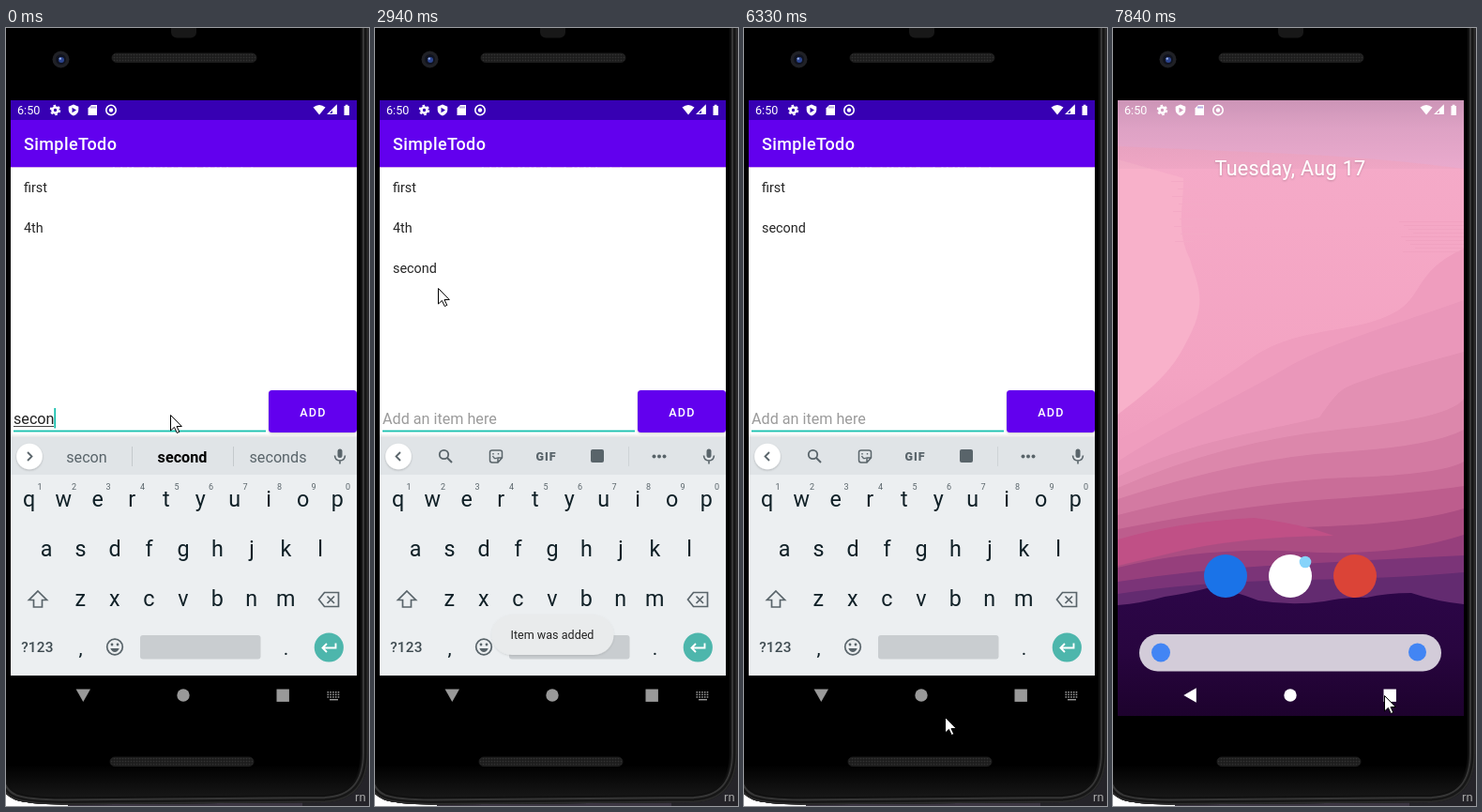
These frames come from a looping animation (387x829 px, 7.99 s). An HTML page:

```html
<!DOCTYPE html>
<html lang="en">
<head>
<meta charset="utf-8">
<title>Todo list demo</title>
<style>
html, body { margin: 0; width: 100%; height: 100%; overflow: hidden; background: #000; }
svg { display: block; width: 100%; height: 100%; font-family: Roboto, "Noto Sans", sans-serif; }
text { white-space: pre; }
</style>
</head>
<body>
<svg id="stage" viewBox="0 0 387 829"></svg>
<script>
const LOOP = 7990;
const TEAL = '#16c0ae', VIOLET = '#6200ee', INK = '#102027', ICON = '#59646a';
const BODY = 'M-8-10H386V772Q386 823 340 825L60 827.500Q22 827 9 822Q-5 816-8 800Z';

// Markup helpers
const text = (x, y, s, size, fill, more = '') =>
  `<text x="${x}" y="${y}" font-size="${size}" fill="${fill}" ${more}>${s}</text>`;
const mid = (x, y, s, size, fill, more = '') => text(x, y, s, size, fill, 'text-anchor="middle" ' + more);
const rect = (x, y, w, h, fill, more = '') =>
  `<rect x="${x}" y="${y}" width="${w}" height="${h}" fill="${fill}" ${more}/>`;
const circle = (x, y, r, fill, more = '') => `<circle cx="${x}" cy="${y}" r="${r}" fill="${fill}" ${more}/>`;
const path = (d, fill, more = '') => `<path d="${d}" fill="${fill}" ${more}/>`;
const line = (d, color, w = 1.6, more = '') => path(d, 'none', `stroke="${color}" stroke-width="${w}" ${more}`);
const group = (id, body, more = '') => `<g id="${id}" ${more}>${body}</g>`;
const gradient = (id, stops) => `<linearGradient id="${id}" x2="0" y2="1">` +
  stops.map(([o, c, a = 1]) => `<stop offset="${o}" stop-color="${c}" stop-opacity="${a}"/>`).join('') +
  '</linearGradient>';
const shadow = (id, blur, alpha) => `<filter id="${id}" x="-20%" y="-30%" width="140%" height="170%">
  <feDropShadow dx="0" dy="1" stdDeviation="${blur}" flood-opacity="${alpha}"/></filter>`;

const defs = `<defs>
  ${gradient('sky', [[0, '#f4acca'], [.2, '#f5a8c6'], [.45, '#f3a3c2'], [.65, '#ec98bb'], [.83, '#6b2f70']])}
  ${gradient('hill', [[0, '#2c0648'], [.5, '#28053f'], [1, '#1d022d']])}
  ${gradient('scrim', [[0, '#403050', .2], [.4, '#403050', .1], [1, '#403050', .03]])}
  ${gradient('lip', [[0, '#000', 0], [1, '#000', .1]])}
  ${gradient('chin', [[0, '#000'], [1, '#1c1c1c']])}
  <pattern id="mesh" width="3" height="3" patternUnits="userSpaceOnUse">
    <rect width="3" height="3" fill="#1d1d1d"/><circle cx="1.5" cy="1.5" r=".8" fill="#323232"/></pattern>
  ${shadow('soft', 1.3, .22)}${shadow('faint', 1.2, .12)}
  <clipPath id="screen"><rect x="5" y="77" width="369" height="656"/></clipPath>
  <clipPath id="case"><path d="${BODY}"/></clipPath>
</defs>`;

function phone() {
  const rim = [[16, '#101010'], [12, '#363636'], [8, '#161616'], [3, '#2c2c2c']];
  return rect(0, 0, 387, 829, '#252429') + rect(0, 800, 66, 29, '#fff') +
    rect(66, 825, 250, 4, '#3c3642') + text(372, 824, 'rn', 13, '#a5a5a5') +
    `<g clip-path="url(#case)">` + path(BODY, '#000') + rect(0, 785, 387, 42, 'url(#chin)') +
    rim.map(([w, c]) => line(BODY, c, w)).join('') + '</g>' +
    rect(0, 0, 376, 20, '#000') +
    rect(176, -8, 27, 18.5, '#181818', 'rx="6"') +
    rect(113, 27, 154, 9.5, 'url(#mesh)', 'rx="4.700" stroke="#222" stroke-width=".800"') +
    rect(111, 777, 153, 9.5, 'url(#mesh)', 'rx="4.700" stroke="#222" stroke-width=".800"') +
    circle(58.5, 33.5, 9, '#202126') + circle(58.5, 33.5, 5.5, '#10131f') +
    circle(59, 34, 3, '#2c458f') + circle(57.8, 32.6, 1.2, '#9db4ea');
}

function status() {
  const w = '#fff';
  return text(12, 92, '6:50', 12.6, w) +
    circle(52.5, 87.5, 3, 'none', `stroke="${w}" stroke-width="2.600"`) +
    circle(52.5, 87.5, 4.8, 'none', `stroke="${w}" stroke-width="1.900" stroke-dasharray="2.510"`) +
    path('M72 81.500L77.300 83.700V87.500Q77 91.500 72 93.600Q67 91.500 66.700 87.500V83.700ZM70.500 84.800V90.200L75 87.500Z', w, 'fill-rule="evenodd"') +
    path('M91 82H97V93H87.500V85.500Z', w) + line('M91 83.500V85.500M93 83.500V85.500M95 83.500V85.500', '#6a4cc0', .9) +
    circle(112, 87.5, 5.2, 'none', `stroke="${w}" stroke-width="1.600"`) + circle(112, 87.5, 2.2, w) +
    path('M327.500 84.500Q334 79.500 340.500 84.500L334 92.500Z', w) +
    line('M343.500 91.500H352.200V82.800Z', w, 1.2) + path('M348 87V91.500H352.500V82.500Z', w) +
    path('M360.500 83H361.800V81.700H364.500V83H366V93H360.500Z', w);
}

function wallpaper() {
  const down = 'V733H5Z';
  const bands = [
    ['M5 77H374V150Q280 138 190 134T5 126Z', '#efaed1'],
    ['M5 412C40 385 62 368 78 335C104 290 88 270 82 246C66 215 76 185 75 160L5 140Z', '#f8b1ca'],
    ['M5 440C60 410 100 385 150 350C195 320 250 325 290 308C335 290 315 262 374 235' + down, '#ef9dbe'],
    ['M5 462C70 420 120 400 180 365C230 335 290 320 374 290' + down, '#ea97ba'],
    ['M5 478C80 440 170 428 220 415C245 380 240 385 290 368L374 345' + down, '#e390b3'],
    ['M5 490Q120 440 240 428T374 395' + down, '#dc87ab'],
    ['M5 502Q140 458 240 452T374 428' + down, '#d37aa2'],
    ['M5 519Q150 482 250 479T374 462' + down, '#c96d98'],
    ['M5 534Q140 508 230 502T374 488' + down, '#bd5d8d'],
    ['M5 558Q80 535 200 532T374 512' + down, '#ab4d82'],
    ['M5 545Q70 526 150 522Q200 528 235 541Q130 542 60 560L5 573Z', '#c05086'],
    ['M5 575Q100 552 200 558T374 540' + down, '#963f7c'],
    ['M5 590Q90 577 180 572T374 562' + down, '#7b3478'],
    ['M5 603Q90 590 200 588T374 580' + down, '#632b70']
  ].map(([d, c]) => path(d, c)).join('');
  const streaks = Array.from({ length: 9 }, (_, i) =>
    rect(62 + i * 7 % 13, 163 + i * 8, 20 + i * 11 % 22, 1, '#f4aac6') +
    rect(305 + i * 5 % 18, 206 + i * 4, 69 - i * 5 % 18, 1, '#ee9fbe', 'opacity=".600"')).join('');
  return rect(5, 77, 369, 656, 'url(#sky)') + bands + streaks +
    path('M5 615Q30 613 55 606Q82 602 104 596Q130 600 155 610Q190 616 225 611Q250 606 270 607Q292 602 318 602Q345 611 374 614V733H5Z', 'url(#hill)');
}

function launcher() {
  return mid(189, 157, 'Tuesday, Aug 17', 21.5, '#fff', 'letter-spacing=".350" filter="url(#soft)"') +
    group('icons', rect(28, 646, 322, 39.5, '#d3ccd9', 'rx="19.700"') +
      circle(120, 584, 23, '#1a73e8') + circle(189, 584, 23, '#fff') + circle(205, 569, 6.3, '#86d3fa') +
      circle(258, 584, 23, '#db4437') + circle(51, 665.5, 10, '#4285f4') + circle(324.5, 665, 9.5, '#4285f4'));
}

function app() {
  const item = (id, y, s) => text(19, y, s, 14.4, '#262626', `id="${id}"`);
  return rect(5, 77, 369, 21, '#3700b3') + rect(5, 98, 369, 50.5, VIOLET) + rect(5, 148.5, 369, 560, '#fff') +
    text(19, 130, 'SimpleTodo', 18, '#fff', 'font-weight="500" letter-spacing=".400"') +
    item('row0', 175, 'first') + item('row1', 218, '4th') + item('row2', 261, 'second') +
    text(8, 422, '', 16.16, '#212121', 'id="entry"') +
    rect(8, 424, 43, 1, '#444', 'id="composing"') +
    rect(8, 428.6, 269, 1.8, TEAL) + rect(8, 405, 1.8, 21.5, TEAL, 'id="caret"') +
    rect(280, 386, 94, 45, VIOLET, 'id="button" rx="3.500" filter="url(#soft)"') +
    mid(327.5, 413.5, 'ADD', 12.57, '#fff', 'font-weight="500" letter-spacing="1.200"');
}

function keyRow(letters, x, y) {
  return [...letters].map((c, i) => mid(x + i * 36.5, y, c, 23.3, INK)).join('');
}

function keyboard() {
  const mic = rect(353.5, 448.5, 5, 9.5, ICON, 'rx="2.500"') +
    line('M350.500 455.500Q351 461 356 461T361.500 455.500M356 461V464.500', ICON);
  const guesses = group('guesses',
    mid(86, 462.5, 'secon', 16.16, ICON, 'id="left"') +
    mid(188, 462.5, 'second', 16.16, '#000', 'font-weight="700"') +
    mid(290, 462.5, 'seconds', 16.16, ICON, 'id="right"') +
    line('M134.500 446V467M242.500 446V467', '#c4c9cc', 1));
  const tools = group('tools',
    circle(73.5, 454.5, 4.7, 'none', `stroke="${ICON}" stroke-width="1.800"`) + line('M77 458L82 463', ICON, 2) +
    line('M125 450H133Q135.500 450 135.500 452V458L131 463H125Q122.500 463 122.500 460.500V452Q122.500 450 125 450ZM131 463V458H135.500', ICON, 1.5) +
    line('M125.500 456Q127.500 460 130 458M126 453V454.500M131.500 453V454.500', ICON, 1.4) +
    mid(182.5, 460.5, 'GIF', 12.5, ICON, 'font-weight="900" letter-spacing="1"') +
    rect(230, 449, 14, 14, ICON, 'rx="2"') + line('M270.500 446V467', '#cfd4d7', 1) +
    [297.5, 303, 308.5].map(x => circle(x, 456.5, 2, ICON)).join(''));
  const digits = [...'1234567890'].map((c, i) => mid(36 + i * 36.5, 492, c, 9, ICON)).join('');
  return rect(5, 432, 369, 4, 'url(#lip)') + rect(5, 436, 369, 254, '#eceff1') + rect(5, 436, 369, 40, '#e0e4e7') +
    circle(25, 456.5, 13.8, '#fff', 'filter="url(#soft)"') +
    line('M23 452L27.500 456.500L23 461', ICON, 1.8, 'id="chevron"') + guesses + tools + mic +
    keyRow('qwertyuiop', 24.7, 510) + digits + keyRow('asdfghjkl', 43, 562.5) + keyRow('zxcvbnm', 79.3, 615.5) +
    line('M34 600L43.500 609.500H38.500V617H29.500V609.500H24.500Z', ICON, 1.7) +
    line('M339.500 601.500H354.500V616.500H339.500L333.500 609ZM342.500 605.500L350 613M350 605.500L342.500 613', ICON, 1.7) +
    mid(33.5, 665, '?123', 15.3, '#3f4b51', 'font-weight="500" letter-spacing=".300"') +
    mid(79.5, 668, ',', 21, INK) + mid(298.5, 668, '.', 21, INK) +
    circle(116, 659.5, 8.3, 'none', `stroke="${ICON}" stroke-width="1.700"`) +
    circle(113, 657, 1.4, ICON) + circle(119, 657, 1.4, ICON) + path('M111.300 661H120.700Q119 665 116 665T111.300 661Z', ICON) +
    rect(143, 647, 128.5, 25.5, '#c9cdd0', 'rx="3"') + circle(344.3, 660, 15.6, '#4db6ac') +
    line('M351.500 655.500V660.500H338M342 656L337.500 660.500L342 665', '#fff', 1.9);
}

function navigation() {
  const dots = Array.from({ length: 15 }, (_, i) => rect(342.5 + i % 5 * 2.8, 707 + Math.floor(i / 5) * 2.6, 1.6, 1.5, '#999')).join('');
  return group('shapes', path('M-7.700-6.500H7.700L0 7Z', 'inherit', 'id="back"') +
    '<circle cx="189" cy="711" r="6.700"/><rect x="288.500" y="704.500" width="13.400" height="13.400"/>') +
    group('imeIcon', dots + rect(345, 715, 9, 1.4, '#999'));
}

const pointer = path('M0 0V16.500L3.900 12.900L6.800 19L9.300 17.900L6.500 12H11.800Z', '#fff', 'id="pointer" stroke="#000" stroke-width="1"');

document.getElementById('stage').innerHTML = defs + phone() +
  `<g clip-path="url(#screen)">` +
  group('home', wallpaper() + rect(5, 77, 369, 73, 'url(#scrim)', 'id="shade"') + group('launcher', launcher())) +
  group('appLayer', group('app', app()) + group('keys', keyboard()) +
    rect(5, 693, 369, 5, '#c9c9c9', 'id="foot"') + rect(5, 690, 369, 50, '#000', 'id="navBar"')) +
  status() + navigation() +
  group('toast', rect(0, 625, 10, 43, '#e9ebec', 'id="toastBox" rx="21.500" filter="url(#faint)"') +
    mid(189, 651, '', 12.57, '#222', 'id="toastText"')) + '</g>' + pointer;

const el = {};
document.querySelectorAll('svg [id]').forEach(n => el[n.id] = n);
const set = (id, attrs) => { for (const k in attrs) el[id].setAttribute(k, attrs[k]); };
const show = (id, on) => set(id, { visibility: on ? 'visible' : 'hidden' });
const say = (id, s) => { if (el[id].textContent !== s) el[id].textContent = s; };
const within = (t, a, b) => t >= a && t < b;

// Piecewise linear track of [time, value...]
function track(t, keys) {
  const i = keys.findIndex(k => k[0] > t);
  if (i < 0) return keys[keys.length - 1].slice(1);
  if (!i) return keys[0].slice(1);
  const a = keys[i - 1], b = keys[i], f = (t - a[0]) / (b[0] - a[0]);
  return a.slice(1).map((v, k) => v + (b[k + 1] - v) * f);
}

const bursts = [[810, 1850, 9], [1970, 2510, 5], [2940, 3850, 8], [4000, 4920, 8], [5050, 6020, 7], [6180, 7140, 8], [7280, 7840, 5]];
function tick(t) {
  let q = 0;
  for (const [a, b, n] of bursts) {
    if (t < a) break;
    const step = (b - a) / (n - 1);
    q = a + step * Math.min(n - 1, Math.floor((t - a) / step + 1e-6));
  }
  return q;
}

const route = [[830, 175, 412], [1100, 225, 424], [1450, 287, 419], [1850, 287, 419], [2240, 165, 345], [2510, 75, 288],
  [2940, 67, 277], [3350, 32, 215], [4130, 30, 215], [4530, 110, 310], [4920, 275, 475], [5050, 307, 530], [5370, 321, 650],
  [5700, 290, 745], [6020, 240, 759], [6590, 191, 711], [6870, 191, 711], [7000, 192, 712], [7280, 205, 714], [7700, 289, 711]];
const fade = [[1590, 0], [1720, .4], [1850, .9], [1970, 1], [3590, 1], [3850, 0], [4000, 0], [4263, 1], [5697, 1], [6020, 0]];
const caretOn = [[0, 810], [1330, 1970], [2510, 2940], [3460, 4000], [4525, 5050], [5535, 6020], [6590, 7020]];

function draw(t) {
  const q = tick(t);
  const added = t >= 1590, removed = t >= 4000, toolbar = t >= 1850;
  const launching = within(t, 6870, 7020), home = t >= 7020;

  const typed = t < 250 ? 'secon' : 'second';
  say('entry', added ? 'Add an item here' : typed);
  set('entry', { fill: added ? '#9b9b9b' : '#212121' });
  show('composing', !added);
  set('composing', { width: t < 250 ? 43 : 52 });
  show('caret', !home && caretOn.some(([a, b]) => within(t, a, b)));
  set('caret', { x: added ? 8 : t < 250 ? 51.3 : 60.5 });
  set('button', { fill: within(t, 1460, 1850) ? '#7018f0' : VIOLET });
  say('row1', removed ? 'second' : '4th');
  show('row2', added && !removed && !home);

  show('guesses', !added);
  say('left', t < 250 ? 'secon' : 'seconds');
  say('right', t < 250 ? 'seconds' : 'secondary');
  show('tools', toolbar && !home);
  set('chevron', { transform: toolbar ? 'rotate(180 25 456.5)' : '' });

  set('appLayer', { display: home ? 'none' : 'inline' });
  set('app', { transform: `translate(0 ${launching ? 3.5 : 0})` });
  set('keys', { transform: `translate(0 ${launching ? 8.5 : 0})`, opacity: launching ? .88 : 1 });
  show('foot', launching);
  set('navBar', { y: launching ? 697.5 : 690 });
  show('imeIcon', t < 6870);
  const turn = home ? 90 : launching ? 9 : 0;
  set('back', { transform: `translate(82.3 711) rotate(${turn})`, fill: t < 6870 ? '#999' : '#fff' });
  set('shapes', { fill: t < 6870 ? '#999' : '#fff' });

  const [rise, solid, shade] = t < 7140 ? [-5, .87, 0] : t < 7280 ? [-1, .97, .5] : [0, 1, 1];
  set('launcher', { transform: `translate(0 ${rise})` });
  set('icons', { opacity: solid });
  set('shade', { opacity: shade });

  const half = removed ? 73 : 65;
  say('toastText', removed ? 'Item was removed' : 'Item was added');
  set('toastBox', { x: 189.5 - half, width: half * 2 });
  set('toast', { opacity: track(q, fade)[0] });

  const [x, y] = track(q, route);
  set('pointer', { transform: `translate(${Math.round(x) + .5} ${Math.round(y) + .5})` });
}

const start = performance.now();
function loop(now) {
  draw(Math.max(0, now - start) % LOOP);
  requestAnimationFrame(loop);
}
draw(0);
requestAnimationFrame(loop);
</script>
</body>
</html>
```
